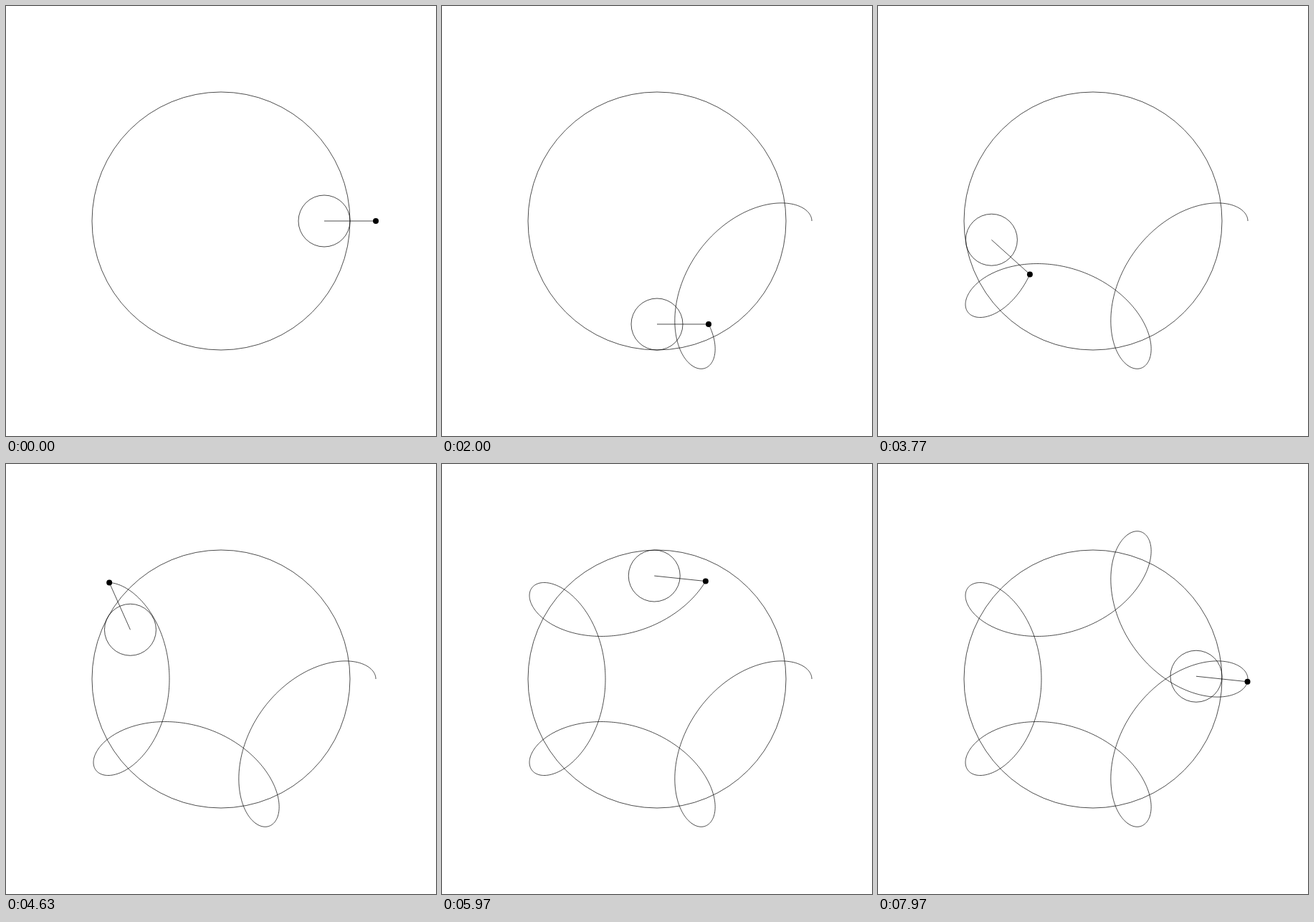
Animation of 600x600 px, one loop 8010 ms. Source, as an HTML page with a canvas:

```html
<!DOCTYPE html>
<html lang="en">
<head>
<meta charset="utf-8">
<title>Hypotrochoid</title>
<style>
  html, body { margin: 0; width: 100%; height: 100%; overflow: hidden; background: #fff; }
  canvas { display: block; }
</style>
</head>
<body>
<canvas id="stage" width="600" height="600"></canvas>
<script>
const ctx = document.getElementById('stage').getContext('2d');
const LOOP = 8010, STEPS = 240, STEP_MS = 100 / 3;
const CENTER = 300, BIG = 180, SMALL = 36, ARM = 72, DOT = 4;
const ORBIT = BIG - SMALL;
const STEP_ANGLE = 2 * Math.PI / STEPS;
const SUBSTEPS = 4;

const hub = a => [CENTER + ORBIT * Math.cos(a), CENTER + ORBIT * Math.sin(a)];

function pen(a) {
  const [x, y] = hub(a);
  const spin = -a * ORBIT / SMALL;
  return [x + ARM * Math.cos(spin), y + ARM * Math.sin(spin)];
}

function circle(x, y, r) {
  ctx.beginPath();
  ctx.arc(x, y, r, 0, 2 * Math.PI);
}

function polyline(points) {
  ctx.beginPath();
  points.forEach(p => ctx.lineTo(...p));
  ctx.stroke();
}

// Steps start on a 10 ms clock, thirty per second.
function stepAt(ms) {
  const tick = Math.floor((ms % LOOP) / 10) * 10;
  return Math.min(STEPS - 1, Math.floor((tick + 3.4) / STEP_MS));
}

function draw(step) {
  const angle = step * STEP_ANGLE;
  const center = hub(angle), tip = pen(angle);

  ctx.fillStyle = '#fff';
  ctx.fillRect(0, 0, 600, 600);
  ctx.fillStyle = ctx.strokeStyle = '#000';
  ctx.lineWidth = 0.7;
  ctx.lineJoin = 'round';

  circle(CENTER, CENTER, BIG);
  ctx.stroke();
  circle(...center, SMALL);
  ctx.stroke();
  polyline([center, tip]);

  if (step > 0) {
    const count = step * SUBSTEPS + 1;
    polyline(Array.from({ length: count }, (_, i) => pen(i * STEP_ANGLE / SUBSTEPS)));
  }

  circle(...tip, DOT);
  ctx.fill();
}

const start = performance.now();
let shown = -1;

function tick() {
  const step = stepAt(performance.now() - start);
  if (step !== shown) draw(shown = step);
  requestAnimationFrame(tick);
}
tick();
</script>
</body>
</html>
```
